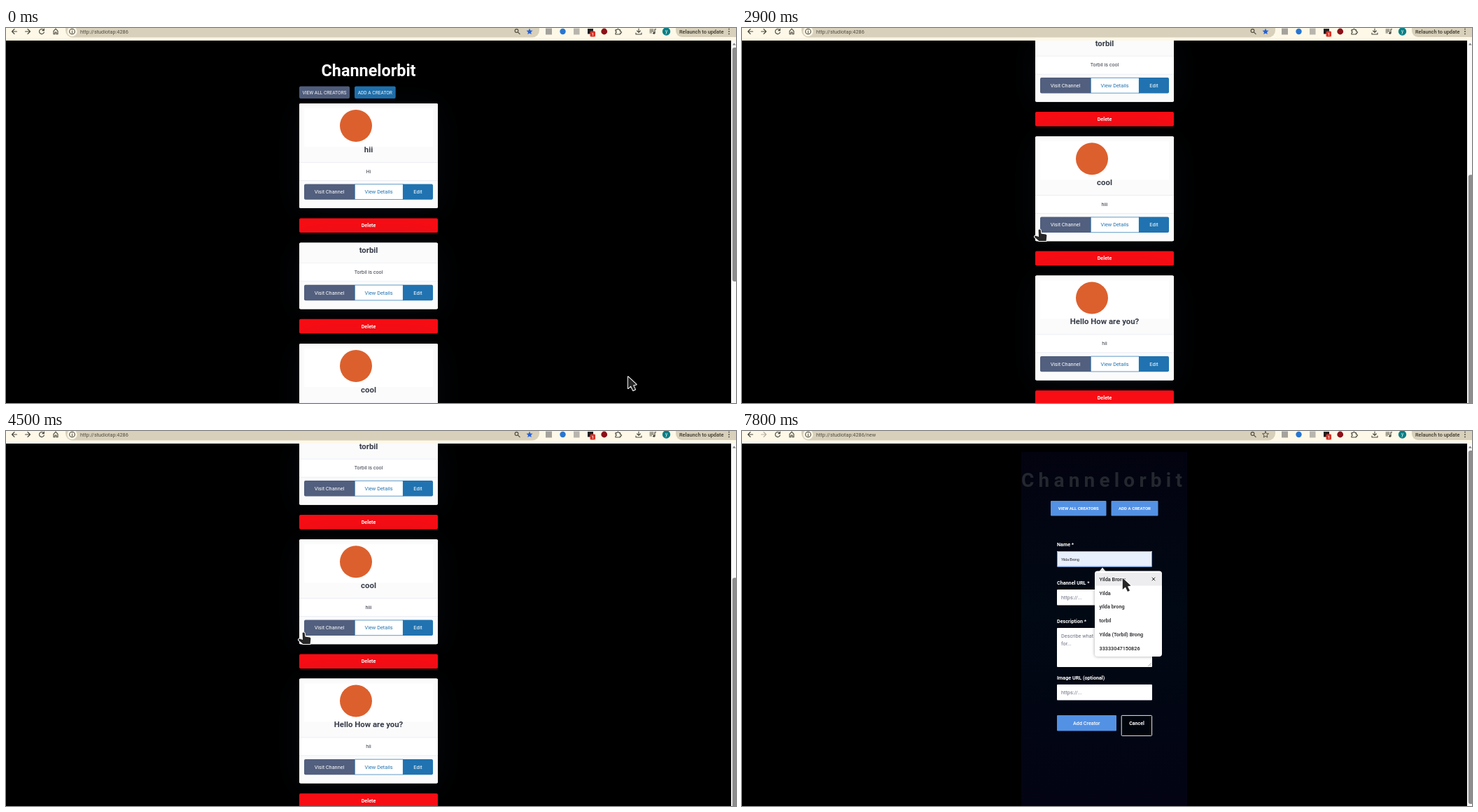
Write an HTML page with a canvas that moves like this. It is 1043 by 537 pixels and loops after 8 s.

```html
<!DOCTYPE html>
<html lang="en">
<head>
<meta charset="utf-8">
<title>Creator list</title>
<style>
html, body { margin: 0; width: 100%; height: 100%; overflow: hidden; background: #000; }
canvas { display: block; }
</style>
</head>
<body>
<canvas id="stage" width="1043" height="537"></canvas>
<script>
const ctx = document.getElementById('stage').getContext('2d');
const W = 1043, H = 537, TOP = 18, MID = 518, LOOP = 8000, STEP = 100;
const SANS = 'Roboto, "Open Sans", sans-serif';
const SLATE = '#525f7e', BLUE = '#2073b0', RED = '#f90d14', SKY = '#5391e4';
const INK = '#373c48', CREAM = '#fdf8e7', FIELD = '#d8d0ba', ICON = '#49463d';

const SITE = 'Channelorbit';
const CARDS = [
  { y: 108, name: 'hii', about: 'Hi', pic: true },
  { y: 307.4, name: 'torbil', about: 'Torbil is cool' },
  { y: 451.9, name: 'cool', about: 'hiii', pic: true },
  { y: 651.2, name: 'Hello How are you?', about: 'hii', pic: true }
];
const HINTS = ['Yilda Brong', 'Yilda', 'yilda brong', 'torbil',
  'Yilda (Torbil) Brong', '33333047150826'];

// time, x, y of the pointer tip
const PATH = [
  [0, 888, 498], [100, 888, 498], [400, 411, 234], [600, 411, 234],
  [900, 272, 136], [1000, 272, 136], [1200, 313, 354], [1400, 313, 354],
  [1800, 437, 447], [2000, 404, 150], [2200, 404, 150], [2400, 426, 288],
  [4600, 426, 288], [4700, 432, 274], [5100, 432, 274], [5200, 455, 87],
  [5600, 455, 87], [5700, 541, 87], [6700, 541, 87], [6800, 545, 184],
  [7700, 545, 184], [7800, 543, 209]
];
// time, scroll offset
const SCROLL = [[0, 0], [2500, 19], [2600, 38], [2900, 296.7], [3500, 0],
  [3900, 296.7], [4200, 0], [4500, 296.7], [4700, 0]];

const held = (keys, t) => keys.reduce((v, k) => t >= k[0] ? k[1] : v, keys[0][1]);

function pointerAt(t) {
  const i = PATH.findIndex(k => k[0] > t);
  if (i < 0) return PATH[PATH.length - 1].slice(1);
  const a = PATH[i - 1], b = PATH[i], p = (t - a[0]) / (b[0] - a[0]);
  return [a[1] + (b[1] - a[1]) * p, a[2] + (b[2] - a[2]) * p];
}

function box(x, y, w, h, fill, r = 0, stroke, width = 1) {
  ctx.beginPath();
  ctx.roundRect(x, y, w, h, r);
  if (fill) { ctx.fillStyle = fill; ctx.fill(); }
  if (stroke) { ctx.strokeStyle = stroke; ctx.lineWidth = width; ctx.stroke(); }
}

function disc(x, y, r, fill) {
  ctx.beginPath();
  ctx.arc(x, y, r, 0, 7);
  ctx.fillStyle = fill;
  ctx.fill();
}

// y is the middle of the capitals
function text(str, x, y, size, fill, weight = 400, align = 'left', family = SANS) {
  ctx.font = `${weight} ${size}px ${family}`;
  ctx.textAlign = align;
  ctx.fillStyle = fill;
  ctx.fillText(str, x, y + size * 0.355);
}
const centred = (str, x, y, size, fill, weight) => text(str, x, y, size, fill, weight, 'center');

function path(d, x, y, { fill, stroke, width = 1.1 }) {
  const p = new Path2D(d);
  ctx.save();
  ctx.translate(x, y);
  ctx.lineJoin = ctx.lineCap = 'round';
  if (stroke) { ctx.strokeStyle = stroke; ctx.lineWidth = width; ctx.stroke(p); }
  if (fill) { ctx.fillStyle = fill; ctx.fill(p); }
  ctx.restore();
}

function star(x, y, filled) {
  let d = '';
  for (let i = 0; i < 10; i++) {
    const r = i % 2 ? 2.1 : 4.7, a = i * Math.PI / 5 - Math.PI / 2;
    d += (i ? 'L' : 'M') + r * Math.cos(a) + ' ' + r * Math.sin(a);
  }
  path(d + 'Z', x, y, filled ? { fill: '#2460d8' } : { stroke: ICON, width: 0.9 });
}

function toolbar(adding) {
  const line = (d, x, color = ICON) => path(d, x, 5, { stroke: color });
  box(0, 0, W, TOP, CREAM);
  box(85, -8, 677, 21.5, FIELD, 10);
  line('M3.5 0H-3.5M0 -3.5L-3.5 0L0 3.5', 12);
  line('M-3.5 0H3.5M0 -3.5L3.5 0L0 3.5', 31, adding ? '#b5b0a2' : ICON);
  line('M3 -1.8A3.5 3.5 0 1 0 3.4 1M3.4 -4V-1.4H.8', 51);
  line('M-3 3.8V-.6L0 -3.8L3 -.6V3.8H1V1H-1V3.8Z', 71);
  disc(94.5, 5, 7, CREAM);
  line('M3.8 0A3.8 3.8 0 1 1 -3.8 0A3.8 3.8 0 1 1 3.8 0M0 -.3V2M0 -2V-1.9', 94.5);
  text('http://studiotap:4286' + (adding ? '/new' : ''), 106, 5.2, 7.3, '#4f4c43');

  line('M1.4 -1A2.4 2.4 0 1 1 -3.4 -1A2.4 2.4 0 1 1 1.4 -1M.8 .8L3.6 3.6', 730.5);
  star(748, 5.3, !adding);
  box(771, 0.5, 9, 9, '#a5a29c');
  disc(795.5, 5, 4.2, '#2776d2');
  box(811, 0.5, 8.5, 9, '#b8b5ae');
  box(831, 1, 8, 7.5, '#1d1d1d');
  box(834.5, 4.5, 7.5, 8, '#dc3327', 1.5);
  centred('1', 838.2, 8.6, 5.5, '#fff', 500);
  disc(854.7, 5, 4.4, '#8c1019');
  line('M-3.6 -2.4H-1.4A1.3 1.3 0 1 1 1.2 -2.4H3V0A1.3 1.3 0 1 1 3 2.2V4H-3.6V2A1.2 1.2 0 0 0 -3.6 -.4Z', 874.5);
  line('M0 -4V1.2M-2.4 -1L0 1.4L2.4 -1M-4 2V4H4V2', 904);
  line('M-4 -3H1M-4 -.6H1M-4 1.8H-1.4M3 2V-3.2H4.6', 924);
  disc(925.8, 7.2, 1.6, ICON);
  disc(943.5, 5, 5.7, '#087f86');
  centred('y', 943.5, 4.8, 6.5, '#fff');
  box(957, -8, 96, 21, FIELD, 9);
  text('Relaunch to update', 962, 5, 7.35, '#39362d', 500);
  for (const y of [1.6, 5, 8.4]) disc(1033, y, 0.9, ICON);
}

function scrollbar(offset, size) {
  box(1036, TOP, 7, H - TOP, '#fafafa');
  path('M-2.4 1.4L0 -1.6L2.4 1.4Z', 1040.3, 23, { fill: '#7c7c7c' });
  box(1037.8, 28 + offset * 0.614, 8, size, '#8d8d8d', 3);
}

function card({ y, name, about, pic }, outlined) {
  const h = pic ? 150 : 95, foot = y + h - 40;
  ctx.save();
  ctx.shadowColor = 'rgba(24,36,64,.24)';
  ctx.shadowBlur = 48;
  ctx.shadowOffsetY = 5;
  box(419, y, 198, h, '#fff', 2);
  ctx.restore();
  box(419, y, 198, h - 66, '#fbfbfc', [2, 2, 0, 0]);
  box(419, foot, 198, 40, '#fbfbfc', [0, 0, 2, 2]);
  box(419, y + h - 66, 198, 0.7, '#e6e9ef');
  box(419, foot, 198, 0.7, '#e6e9ef');
  if (pic) {
    box(426, y + 7, 184, 55, '#fff');
    disc(500, y + 32, 23, '#dc602e');
  }
  centred(name, MID, y + h - 84.2, 11.4, INK, 700);
  centred(about, MID, y + h - 53, 7.2, INK);

  const by = y + h - 34.6, ty = by + 11.3;
  box(426, by, 72.5, 22.4, SLATE, [2, 0, 0, 2]);
  box(498.4, by + 0.3, 69, 21.8, '#fff', 0, BLUE, 0.7);
  box(567, by, 43, 22.4, BLUE, [0, 2, 2, 0]);
  centred('Visit Channel', 462, ty, 7.3, '#fff');
  centred('View Details', 532.5, ty, 7.3, BLUE);
  centred('Edit', 588.5, ty, 7.3, '#fff');

  const dy = y + h + 14.4;
  box(419, dy, 198, 20.6, RED, 2);
  if (outlined) box(419.1, dy + 0.1, 197.8, 20.4, null, 2, '#6a35c4', 0.8);
  centred('Delete', MID, dy + 10.3, 7.2, '#fff', 700);
}

function listPage(t, scroll) {
  ctx.save();
  ctx.translate(0, -scroll);
  centred(SITE, MID, 60.3, 23.4, '#fff', 700);
  const viewHover = t >= 5200 && t < 5700, addHover = t >= 5700;
  box(419, 83.5, 72, 17.6, viewHover ? '#46526e' : SLATE, 2);
  box(498, 83.5, 58.7, 17.6, addHover ? '#1b669d' : BLUE, 2);
  centred('VIEW ALL CREATORS', 455, 92.3, 6.65, t >= 5200 && t < 5900 ? '#4a68c0' : '#fff');
  centred('ADD A CREATOR', 527.3, 92.3, 6.65, t >= 5900 ? '#2c5ec4' : '#fff');
  const deleteHover = t >= 2400 && t < 5200 && scroll < 100 && !(t >= 4200 && t < 4500);
  CARDS.forEach((c, i) => card(c, i === 0 && deleteHover));
  ctx.restore();
  scrollbar(scroll, 335);
}

function input(label, y, h, placeholder = []) {
  text(label, 450, y - 9.3, 7.2, '#fff', 700);
  box(450, y, 136, h, '#fff', 1);
  placeholder.forEach((s, i) => text(s, 456, y + 11.2 + i * 11, 7.3, '#6b7080'));
}

function hintList(picked) {
  ctx.save();
  ctx.shadowColor = 'rgba(0,0,0,.35)';
  ctx.shadowBlur = 4;
  path('M-5 6L0 0L5 6Z', 515, 195.5, { fill: '#fff' });
  box(504, 200.5, 96, 122.5, '#fff', 4);
  ctx.restore();
  if (picked) {
    box(504, 203, 96, 18.5, '#ededef');
    path('M-2 -2L2 2M2 -2L-2 2', 588, 212, { stroke: '#333', width: 1 });
  }
  HINTS.forEach((s, i) => text(s, 510.5, 212.2 + i * 19.75, 7.3, '#202124', 500));
}

function formPage(t) {
  const focused = t >= 7300, picked = t >= 7800;
  const g = ctx.createLinearGradient(0, 30, 0, H);
  g.addColorStop(0, '#030310');
  g.addColorStop(0.45, '#010914');
  g.addColorStop(1, '#030313');
  box(399, 30, 237, H - 30, g);
  ctx.letterSpacing = '6.2px';
  text(SITE, 399, 70, 28, '#24272e', 700);
  ctx.letterSpacing = '0px';

  box(441, 100, 79.5, 21.6, SKY, 1);
  box(527.5, 100, 67, 21.6, SKY, 1);
  centred('VIEW ALL CREATORS', 480.8, 110.7, 6, '#fff', 700);
  centred('ADD A CREATOR', 561, 110.7, 6.1, '#fff', 700);

  input('Name *', 172, 22.6);
  if (focused) box(450.5, 172.5, 135, 21.6, picked ? '#e8effd' : '#fff', 1, '#6a9be8');
  if (picked) text(HINTS[0], 456, 184, 5, '#111', 400, 'left', '"Liberation Sans", Arial, sans-serif');
  input('Channel URL *', 227, 22.4, ['https://...']);
  input('Description *', 282, 56, ['Describe what they are known', 'for...']);
  path('M0 4L4 0M2.4 4L4 2.4', 580.5, 332.5, { stroke: '#777', width: 0.6 });
  input('Image URL (optional)', 363, 22.4, ['https://...']);

  box(450, 407, 85, 22.6, SKY, 1);
  centred('Add Creator', 492.3, 418.3, 7.2, '#fff', 500);
  box(542.2, 407.4, 43.4, 29, '#00050d', 1, '#e8e8ea');
  centred('Cancel', 564, 419, 7, '#fff', 700);
  if (focused) hintList(picked);
  scrollbar(0, 506);
}

function pointer(t) {
  const [x, y] = pointerAt(t);
  const look = { fill: '#262626', stroke: '#fff', width: 2 };
  if (t >= 6800 && t < 7800)
    path('M-2 -5.5H2M0 -5.5V5.5M-2 5.5H2', x, y, { stroke: '#222', width: 1 });
  else if (t >= 2400 && t < 6800)
    path('M-2.4 1.6Q-2.4 .4 -1 .4Q.6 .4 .8 1.8L1.4 6.4L8 7.4Q9.6 7.8 9.4 9.6L8.6 17H-1.6L-8 11.6Q-8.4 9.8 -6.6 9.6L-2 11Z', x, y, look);
  else
    path('M.8 1.4V18L4.8 14.6L8 21L11 19.6L8 13.4L12.6 12.6Z', x, y, look);
}

function draw() {
  const t = Math.floor((performance.now() % LOOP) / STEP) * STEP;
  const adding = t >= 6800;
  box(0, 0, W, H, '#000');
  if (adding) formPage(t);
  else listPage(t, held(SCROLL, t));
  toolbar(adding);
  pointer(t);
  requestAnimationFrame(draw);
}
draw();
</script>
</body>
</html>
```
